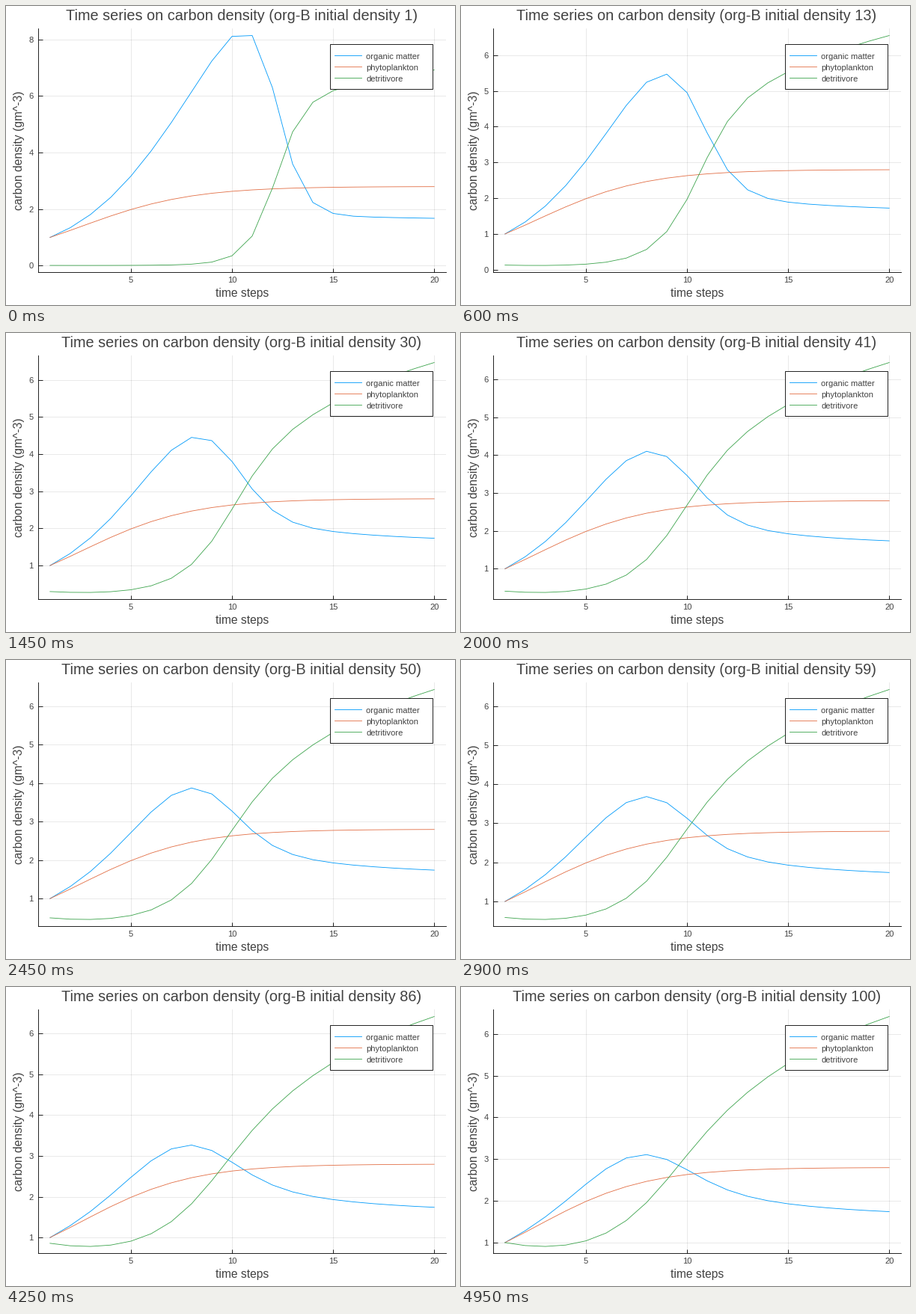
A matplotlib script for the animation above (5000 ms loop, 600 by 400 pixels).

```python
import math

import numpy as np
import matplotlib.pyplot as plt
from matplotlib.animation import FuncAnimation
from matplotlib.patches import Rectangle

W, H, DPI = 600, 400, 100
PX = 72 / DPI  # points per pixel
THIN = 0.85 * PX
LEFT, RIGHT, TOP, BOTTOM = 43.4, 587.6, 30.3, 356.3
RUNS, STEPS, SUB = 100, 20, 20

INK = "#424242"
SERIES = [
    ("organic matter", "#009AFA"),
    ("phytoplankton", "#E26F46"),
    ("detritivore", "#3DA44D"),
]

plt.rcParams["font.family"] = "Liberation Sans"
plt.rcParams["text.color"] = INK


def rates(state):
    """Carbon flow between organic matter, phytoplankton and detritivore."""
    om, phyto, det = state
    return np.array([
        0.16 * phyto + 0.13 * phyto**2 + 0.2592 * det - 0.2818 * om * det,
        0.37 * phyto * (1 - phyto / 2.8),
        0.1654 * om * det - 0.2624 * det,
    ])


def simulate():
    """Runge-Kutta for all runs at once; result is (step, series, run)."""
    start = np.arange(1, RUNS + 1) / 100
    state = np.array([np.ones(RUNS), np.ones(RUNS), start])
    out = [state]
    h = 1 / SUB
    for _ in range(STEPS - 1):
        for _ in range(SUB):
            k1 = rates(state)
            k2 = rates(state + h / 2 * k1)
            k3 = rates(state + h / 2 * k2)
            k4 = rates(state + h * k3)
            state = state + h / 6 * (k1 + 2 * k2 + 2 * k3 + k4)
        out.append(state)
    return np.array(out)


def padded(lo, hi):
    pad = 0.03 * (hi - lo)
    return lo - pad, hi + pad


data = simulate()
steps = np.arange(1, STEPS + 1)

fig = plt.figure(figsize=(W / DPI, H / DPI), dpi=DPI, facecolor="white")

# Plot area
ax = fig.add_axes([LEFT / W, 1 - BOTTOM / H, (RIGHT - LEFT) / W, (BOTTOM - TOP) / H])
ax.set_xlim(*padded(1, STEPS))
ax.set_xticks([5, 10, 15, 20])
ax.yaxis.set_major_formatter("{x:.0f}")
ax.set_axisbelow(True)
ax.grid(color="black", alpha=0.1, linewidth=THIN)
ax.tick_params(direction="in", length=5.5 * PX, width=THIN, color="black",
               labelsize=8, labelcolor=INK)
ax.tick_params(axis="x", pad=6 * PX)
ax.tick_params(axis="y", pad=7 * PX)
for side in ("top", "right"):
    ax.spines[side].set_visible(False)
for side in ("left", "bottom"):
    ax.spines[side].set_linewidth(THIN)
curves = [ax.plot(steps, steps, color=color, lw=THIN)[0] for _, color in SERIES]

# Titles and legend, placed in pixels
over = fig.add_axes([0, 0, 1, 1], zorder=2)
over.set_xlim(0, W)
over.set_ylim(H, 0)
over.axis("off")
title = over.text(315, 19, "", fontsize=14.27, ha="center")
over.text(316, 389.5, "time steps", fontsize=11.25, ha="center")
over.text(22, 193, "carbon density (gm^-3)", fontsize=11.25, ha="center",
          va="baseline", rotation=90, rotation_mode="anchor")

over.add_patch(Rectangle((433, 51), 137, 60, facecolor="white",
                         edgecolor="black", linewidth=THIN))
for row, (name, color) in enumerate(SERIES):
    y = 66 + 15 * row
    over.plot([439, 475], [y, y], color=color, lw=THIN)
    over.text(481, y + 5, name, fontsize=8)


def update(frame):
    values = data[:, :, frame]
    for curve, ys in zip(curves, values.T):
        curve.set_ydata(ys)
    lo, hi = padded(values.min(), values.max())
    gap = 2 if hi >= 7 else 1
    ax.set_yticks(range(math.ceil(lo / gap) * gap, math.floor(hi) + 1, gap))
    ax.set_ylim(lo, hi)
    title.set_text(
        f"Time series on carbon density (org-B initial density {frame + 1})")
    return [*curves, title]


anim = FuncAnimation(fig, update, frames=RUNS, interval=50, repeat=True,
                     repeat_delay=0, blit=False)
plt.show()
```
